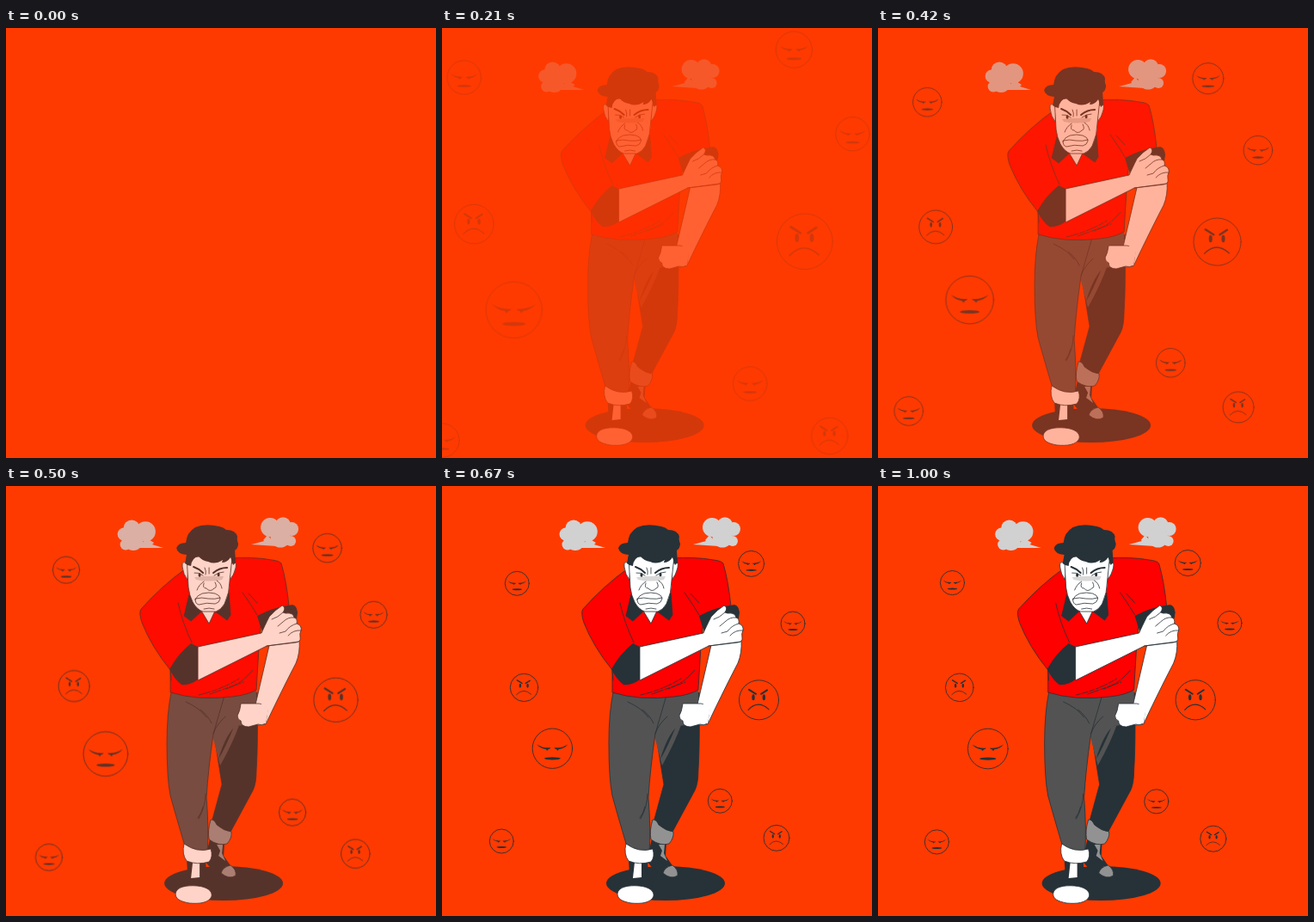
Write an HTML page that moves like this. It is 500 by 500 pixels and loops after 1040 ms.

```html
<!DOCTYPE html>
<html lang="en">
<head>
<meta charset="utf-8">
<title>Angry man</title>
<style>
  html, body { margin: 0; width: 100%; height: 100%; overflow: hidden; background: #ff3a00; }
  svg { display: block; width: 100%; height: 100%; }
  .ink { fill: #263238; }
  .white { fill: #fff; }
  .red { fill: #f00; }
  .cloth { fill: #535353; }
  .gray { fill: #929292; }
  .smoke { fill: #d1d1d1; }
  .edge { stroke: #263238; stroke-width: .8; stroke-linejoin: round; }
  .line { fill: none; stroke: #263238; stroke-width: .8; stroke-linecap: round; stroke-linejoin: round; }
  .brow { fill: none; stroke: #263238; stroke-width: 2; stroke-linecap: round; }
</style>
</head>
<body>
<svg viewBox="0 0 500 500">
  <g id="scene" opacity="0">
    <g id="faces"></g>
    <g id="man">
      <ellipse class="ink" cx="260" cy="462" rx="69" ry="20"/>

      <!-- far leg and shoe -->
      <path class="ink" d="M244 410L238 436Q251 453 262 455L274 450 260 430 261 415Z"/>
      <path class="gray" d="M252 417L259 417 258 427 262 436 254 430 256 424Z"/>
      <path class="gray edge" d="M257 450Q259 443 268 441Q275 446 274 453Q266 458 257 450Z"/>
      <path class="ink edge" d="M248 284L299 240Q300 300 298 330Q298 346 294 354L267 404 246 391 258 347Z"/>
      <path class="cloth" d="M242 242L298 238 299 276 275 279 254 318 247 290Z"/>
      <path class="ink" d="M272 281Q262 291 254 317Q262 306 272 281Z"/>
      <path class="cloth" d="M278 278Q271 298 256 325L254 318Q262 304 272 280Z"/>
      <path class="gray edge" d="M245 388Q249 387 252 394Q260 401 269 402Q270 409 264 416Q254 419 243 411Q241 401 245 388Z"/>

      <!-- near leg and shoe -->
      <path class="ink" d="M217 434L239 434 240 452 245 466 206 470 218 452Z"/>
      <path class="white" d="M224 438L232 438 232 455 222 456Z"/>
      <path class="white edge" d="M204 474C205 466 217 464 229 465C241 466 247 471 246 477C243 485 231 486 220 485C209 483 204 480 204 474Z"/>
      <path class="cloth edge" d="M199 240Q194 264 194 299Q194 340 198 360Q204 382 215 419L241 427Q243 400 240 362Q242 330 248 288L262 240Z"/>
      <path class="white edge" d="M214 416Q229 427 245 422Q248 431 243 437Q229 441 217 436Q211 428 214 416Z"/>
      <path class="line" d="M216 251Q232 258 240 269M233 260Q242 267 246 276M262 268Q251 278 248 288M239 358Q239 372 231 387M236 373Q234 381 230 386"/>

      <!-- shirt -->
      <path class="red edge" d="M216 96Q188 116 164 143Q161 147 165 159Q176 187 198 214L198 240Q230 250 270 245Q288 243 298 237L301 187 303 164 336 140Q333 110 327 90Q325 87 316 86Q294 82 266 84Z"/>
      <path class="line" d="M207 136Q212 159 223 182M198 214L199 226M282 124Q292 138 299 150M289 125L299 136"/>
      <path class="line" stroke-dasharray="14 2 6 2" d="M231 243Q257 237 278 224M263 236Q281 230 294 214M244 242L283 228"/>
      <path class="ink" d="M299 151Q317 141 340 138Q345 139 346 147L345 154 307 174Q302 163 299 151Z"/>
      <path class="ink" d="M197 213Q207 195 222 183L230 187 230 225Q221 232 211 231Q203 225 197 213Z"/>

      <!-- far forearm and fist -->
      <path class="white edge" d="M314 181L348 179Q349 194 344 206Q333 227 317 260L309 277 299 278 297 254Q305 220 314 181Z"/>
      <path class="white edge" d="M280 253L297 253Q306 252 311 259L309 276Q304 279 300 277L289 280Q280 280 280 273Q276 272 276 267Q279 262 280 253Z"/>
      <path class="white" d="M303 254L314 248 309 276 303 276Z"/>

      <!-- near forearm and hand -->
      <path class="white edge" d="M230 187L304 171Q307 164 313 152Q320 144 328 139Q333 141 329 147L332 148Q341 147 342 153Q346 154 345 160Q351 162 350 168Q348 171 349 176Q350 181 344 182L310 186 230 226Z"/>
      <path class="line" d="M329 147Q323 153 316 155M342 153Q335 152 329 158L323 163M345 160Q337 162 332 169L325 171M350 168Q341 167 335 174M310 186L347 181"/>

      <!-- collar and head -->
      <path class="ink edge" d="M220 126L214 151 222 157 235 145ZM266 124L268 150 264 156 249 145Z"/>
      <path class="white edge" d="M234 145L243 160 250 145Z"/>
      <path class="white edge" d="M219 91Q211 85 212 94Q213 103 218 109ZM268 91Q276 85 274 95Q272 104 267 109Z"/>
      <path class="white edge" d="M217 82L219 118Q220 127 224 135Q229 144 236 146L251 146Q257 144 261 137Q267 124 267 110L270 82Z"/>
      <path class="ink" d="M215 90L217 80Q206 79 205 72Q207 66 216 66Q217 54 227 48Q238 43 255 47Q260 48 263 51Q274 51 276 59Q275 62 277 67Q277 72 273 75L274 89 271 92 268 83Q264 89 258 89Q258 88 259 86Q250 92 242 88Q235 87 231 82Q223 83 222 93L218 92Z"/>
      <path fill="#d8d8d8" d="M226 106Q243 104 260 105L258 109Q242 112 228 109Z"/>
      <path class="brow" d="M225 94Q231 96 236 101M264 95Q255 95 248 101"/>
      <ellipse class="ink" cx="232" cy="103.500" rx="1.500" ry="2.300"/>
      <ellipse class="ink" cx="254" cy="103" rx="1.500" ry="2.300"/>
      <path class="line" d="M238 95Q240 99 239 103M243 95L243 102M226 101Q231 100 236 104M249 104Q254 100 260 100M237 111Q231 115 229 121M252 110Q257 113 258 119M237 113Q235 119 240 119Q244 124 249 119Q253 118 250 112M237 143Q243 141 249 143"/>
      <path class="line" d="M227 132Q229 127 235 125Q243 123 250 125Q256 127 256 131Q255 136 250 137Q240 135 231 138Q227 137 227 132ZM227 131Q235 129 242 131Q250 132 256 130"/>

      <!-- steam -->
      <g class="smoke">
        <circle cx="153" cy="49" r="9.500"/><circle cx="169" cy="53" r="11.800"/>
        <circle cx="144" cy="56" r="7.500"/><circle cx="146" cy="68" r="6.500"/>
        <circle cx="155" cy="64" r="11"/>
        <path d="M171 61L179 66 177 68 190 72 158 72Z"/>
        <circle cx="314" cy="48" r="11"/><circle cx="329" cy="45" r="8.800"/>
        <circle cx="339" cy="50" r="8"/><circle cx="338" cy="64" r="6"/>
        <circle cx="326" cy="60" r="11.500"/>
        <path d="M311 57L306 63 307 64 292 68 322 70Z"/>
      </g>
    </g>
  </g>
</svg>
<script>
  const $ = id => document.getElementById(id);

  // Both kinds are drawn at a radius of 23.
  const ring = '<circle class="line" r="23" style="stroke-width:.9;vector-effect:non-scaling-stroke"/>';
  const sulk = ring +
    '<path class="ink" d="M-18 -5Q-11 0 -2 -1Q-3 1 -5 1Q-5 3 -7 2L-7 1Q-14 0 -18 -5Z' +
    'M18 -5Q11 0 2 -1Q3 1 5 1Q5 3 7 2L7 1Q14 0 18 -5Z"/>' +
    '<ellipse class="ink" cy="11.500" rx="9.500" ry="1.600"/>';
  const frown = ring +
    '<path class="brow" d="M-11.500 -12L-3.500 -7M2.500 -7L9.500 -11.500"/>' +
    '<ellipse class="ink" cx="-6.500" cy="-3" rx="1.700" ry="3.500"/>' +
    '<ellipse class="ink" cx="5.800" cy="-3" rx="1.700" ry="3.500"/>' +
    '<path class="line" style="stroke-width:1.100" d="M-12.500 11.500Q-1 -.5 11.500 11"/>';

  const face = (kind, x, y, r) =>
    `<g transform="translate(${x} ${y}) scale(${r / 23})">${kind}</g>`;

  $('faces').innerHTML = [
    face(sulk, 87.3, 113.3, 14), face(frown, 95.5, 234.4, 16.2),
    face(sulk, 128.4, 305.2, 23.2), face(sulk, 69.3, 413, 14),
    face(sulk, 359.6, 90.4, 15), face(sulk, 408, 160, 14),
    face(frown, 368.5, 248.8, 23), face(sulk, 323.3, 366.2, 14),
    face(frown, 389, 409.3, 15)
  ].join('');

  const LOOP = 1040, STEP = 1000 / 24;
  const clamp = v => Math.min(1, Math.max(0, v));

  function draw(time) {
    const n = Math.floor((time % LOOP + 4) / STEP);
    const enter = clamp((n - 2.6) / 12);
    const sway = Math.sin(Math.PI * clamp((n - 14.6) / 9.8)) ** 2;
    const shift = -30 * (1 - enter) + 2 * sway - 0.4;
    const zoom = 1.006 * (1 + 0.5 * (1 - enter) - 0.031 * sway);
    $('scene').setAttribute('opacity', enter);
    $('man').setAttribute('transform', `translate(${shift} 0)`);
    $('faces').setAttribute('transform',
      `translate(238 250) scale(${zoom}) translate(-238 -250)`);
  }

  const start = performance.now();
  function tick() {
    draw(performance.now() - start);
    requestAnimationFrame(tick);
  }
  tick();
</script>
</body>
</html>
```
